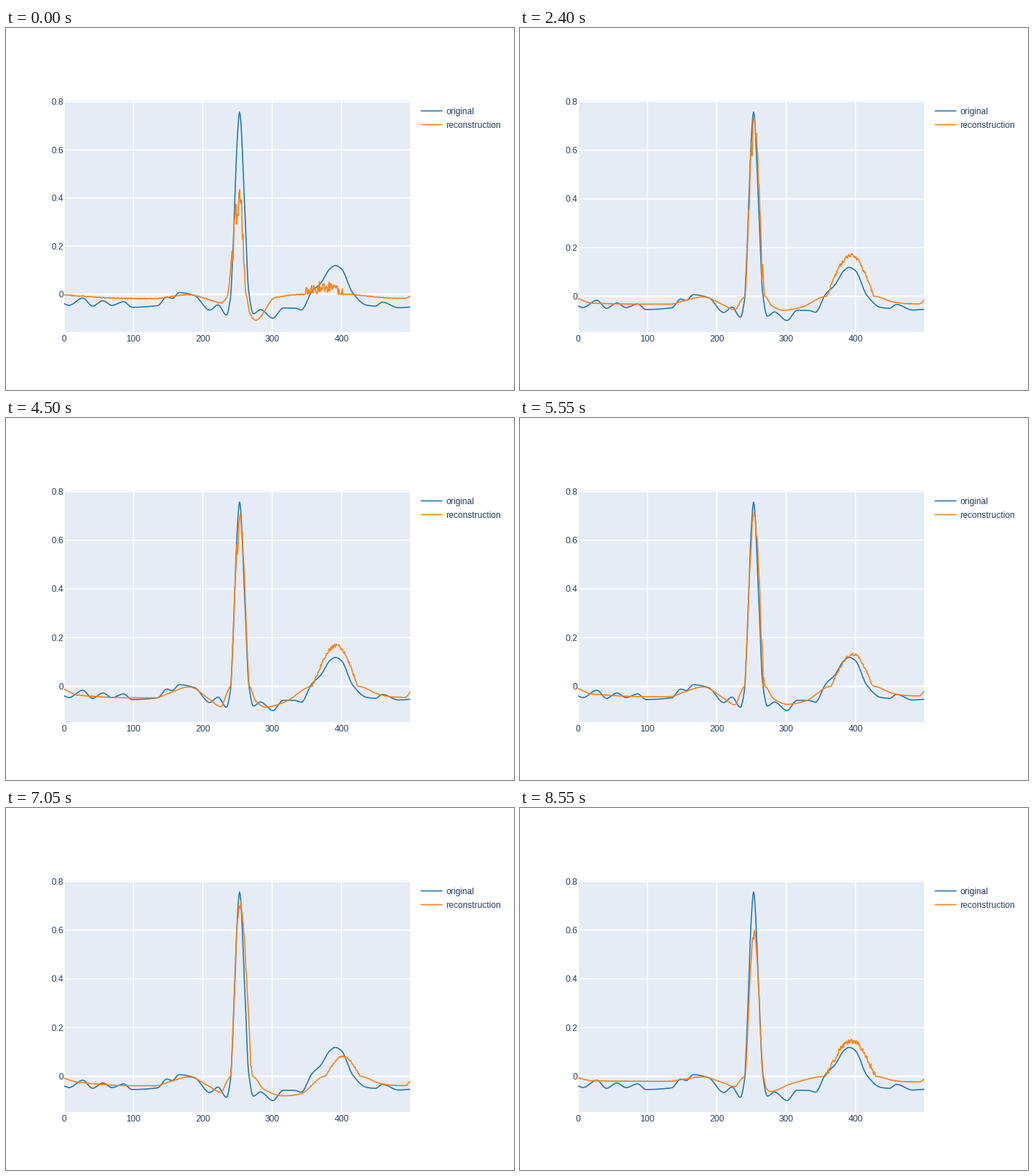
Animation of 700 by 500 pixels, one loop 9050 ms. Source, as a matplotlib script:

```python
import numpy as np
import matplotlib.pyplot as plt
from matplotlib.animation import FuncAnimation
from matplotlib.patches import Rectangle

W, H, DPI = 700, 500, 100
LEFT, RIGHT, TOP, BOTTOM = 80, 557, 100, 420
PX = 72 / DPI
BLUE, ORANGE, INK, PANEL = "#1f77b4", "#ff7f0e", "#2a3f5f", "#e5ecf6"
STEP_MS, TICK_MS, LOOP_MS = 150, 50, 9050
LAST = 57
T = np.arange(500)


def curve(points):
    """Monotone cubic through (sample, value) points."""
    x, y = np.array(points, float).T
    h = np.diff(x)
    d = np.diff(y) / h
    m = np.zeros_like(x)
    same = d[:-1] * d[1:] > 0
    a, b = d[:-1][same], d[1:][same]
    m[1:-1][same] = 2 * a * b / (a + b)
    m[0], m[-1] = d[0], d[-1]
    i = np.clip(np.searchsorted(x, T, side="right") - 1, 0, len(h) - 1)
    s = (T - x[i]) / h[i]
    return (y[i] * (1 + 2 * s) * (1 - s) ** 2 + h[i] * m[i] * s * (1 - s) ** 2
            + y[i + 1] * s * s * (3 - 2 * s) + h[i] * m[i + 1] * s * s * (s - 1))


def bump(start, mid, end, top, power):
    u = np.interp(T, [start, mid, end], [0, 1, 0])
    return top * np.sin(np.pi / 2 * u) ** power


# turning points of the heartbeat, in thousandths
signal = curve([
    (0, -39), (7, -46), (27, -16), (41, -49), (56, -27), (69, -46), (86, -31),
    (98, -54), (135, -47), (148, -11), (156, -17), (166, 7), (188, -5), (210, -66),
    (222, -44), (234, -86), (240, -13), (243, 150), (250, 660), (253, 757),
    (261, 325), (266, 16), (273, -81), (283, -64), (301, -99), (316, -57),
    (333, -58), (342, -65), (357, 10), (370, 46), (383, 105), (391, 119),
    (400, 105), (416, 6), (436, -45), (449, -49), (459, -33), (482, -56), (499, -53),
]) / 1000

# how the reconstruction's features drift while training
STEPS = [0, 8, 16, 30, 43, 51, 57]
DRIFT = dict(
    early=[-7, -9, -28, -36, -27, -21, -18],
    late=[-18, -19, -32, -47, -38, -39, -20],
    q=[-36, -39, -55, -83, -69, -62, -42],
    rise=[236, 241, 241, 240, 240, 240, 241],
    top=[450, 575, 735, 715, 715, 746, 600],
    fall=[262, 264, 269, 267, 271, 272, 267],
    s=[-109, -41, -57, -85, -64, -96, -62],
    s_at=[276, 276, 296, 290, 312, 320, 276],
    hold=[0.13, 0.63, 0.8, 0.77, 0.87, 0.95, 0.47],
    on=[347, 361, 358, 358, 370, 382, 357],
    off=[402, 420, 427, 424, 427, 427, 429],
    crest=[32, 76, 168, 166, 102, 62, 146],
    tail=[-17, -20, -31, -45, -34, -42, -23],
    rough=[25, 9, 8, 8, 4, 4, 12],
    jag=[120, 160, 150, 100, 80, 10, 40],
)


def reconstruction(step):
    v = {name: np.interp(step, STEPS, values) for name, values in DRIFT.items()}
    rise, fall, on, off = v["rise"], v["fall"], v["on"], v["off"]
    q, s, s_at, late, tail = v["q"], v["s"], v["s_at"], v["late"], v["tail"]
    base = curve([
        (0, 0.3 * v["early"]), (20, v["early"]), (100, late), (132, late),
        (152, 0.58 * late), (180, -2), (209, 0.62 * q), (226, q), (235, 0.3 * q),
        (rise, 0), (fall, 0), (0.6 * fall + 0.4 * s_at, 0.7 * s), (s_at, s),
        (0.6 * s_at + 0.4 * on, v["hold"] * s), (on, 0), (off, 0),
        (455, 0.75 * tail), (475, 0.97 * tail), (492, tail), (499, 0.5 * tail)])
    y = base + bump(rise, 253.5, fall, v["top"], 1.4)
    y += bump(on, (on + off) / 2 + 1, off, v["crest"], 1.1)

    rng = np.random.default_rng(step)
    noise = rng.uniform(-1, 1, T.size)
    wave = (T > on) & (T < off)
    spike = (T > rise + 5) & (T < fall - 2)
    y += noise * np.where(wave, v["rough"], 0.07 * v["rough"])
    y[wave] = np.maximum(y[wave], 0)
    y[spike] -= v["jag"] * rng.random(spike.sum()) ** 3
    return y / 1000


fig = plt.figure(figsize=(W / DPI, H / DPI), dpi=DPI, facecolor="white")
ax = fig.add_axes([0, 0, 1, 1])
ax.set(xlim=(0, W), ylim=(H, 0))
ax.axis("off")


def px_x(sample):
    return LEFT + (RIGHT - LEFT) * sample / (T.size - 1)


def label(x, base, text, ha):
    return ax.text(x, base, text, ha=ha, va="baseline", color=INK,
                   fontfamily="Liberation Sans", fontsize=12 * PX)


def stroke(x, y, color, width, z, **kw):
    return ax.plot(x, y, color=color, lw=width * PX, zorder=z, **kw)[0]


FLAT = dict(solid_capstyle="butt", snap=False)
panel = Rectangle((LEFT, TOP), RIGHT - LEFT, BOTTOM - TOP, fc=PANEL, lw=0, zorder=0)
ax.add_patch(panel)

for tick in range(0, 500, 100):
    x = px_x(tick)
    stroke([x, x], [TOP, BOTTOM], "white", 1.6 if tick else 2, 1, **FLAT)
    label(x, 433, str(tick), "center")

rows = []
for n in range(5):
    line = stroke([LEFT, RIGHT], [0, 0], "white", 1.6 if n else 2.2, 1, **FLAT)
    rows.append((n / 5, line, label(79, 0, f"{n / 5:g}", "right")))

traces = []
for z, (name, color, y) in enumerate([("original", BLUE, 114.5),
                                      ("reconstruction", ORANGE, 133.5)], 2):
    trace = stroke(px_x(T), T * 0.0, color, 1.6, z, solid_joinstyle="round")
    trace.set_clip_path(panel)
    traces.append(trace)
    stroke([571.5, 601.5], [y, y], color, 1.6, z, **FLAT)
    label(606.54, y + 4.3, name, "left")


def draw(i):
    step = min(i * TICK_MS // STEP_MS, LAST)
    data = [signal, reconstruction(step)]
    low, high = np.min(data), np.max(data)
    pad = (high - low) / 18
    scale = (BOTTOM - TOP) / (high - low + 2 * pad)

    def px_y(value):
        return TOP + (high + pad - value) * scale

    for value, line, text in rows:
        y = px_y(value)
        line.set_ydata([y, y])
        text.set_y(y + 4.3)
    for trace, values in zip(traces, data):
        trace.set_ydata(px_y(values))
    return traces


anim = FuncAnimation(fig, draw, frames=LOOP_MS // TICK_MS, interval=TICK_MS,
                     repeat=True, repeat_delay=0, blit=False)
plt.show()
```
